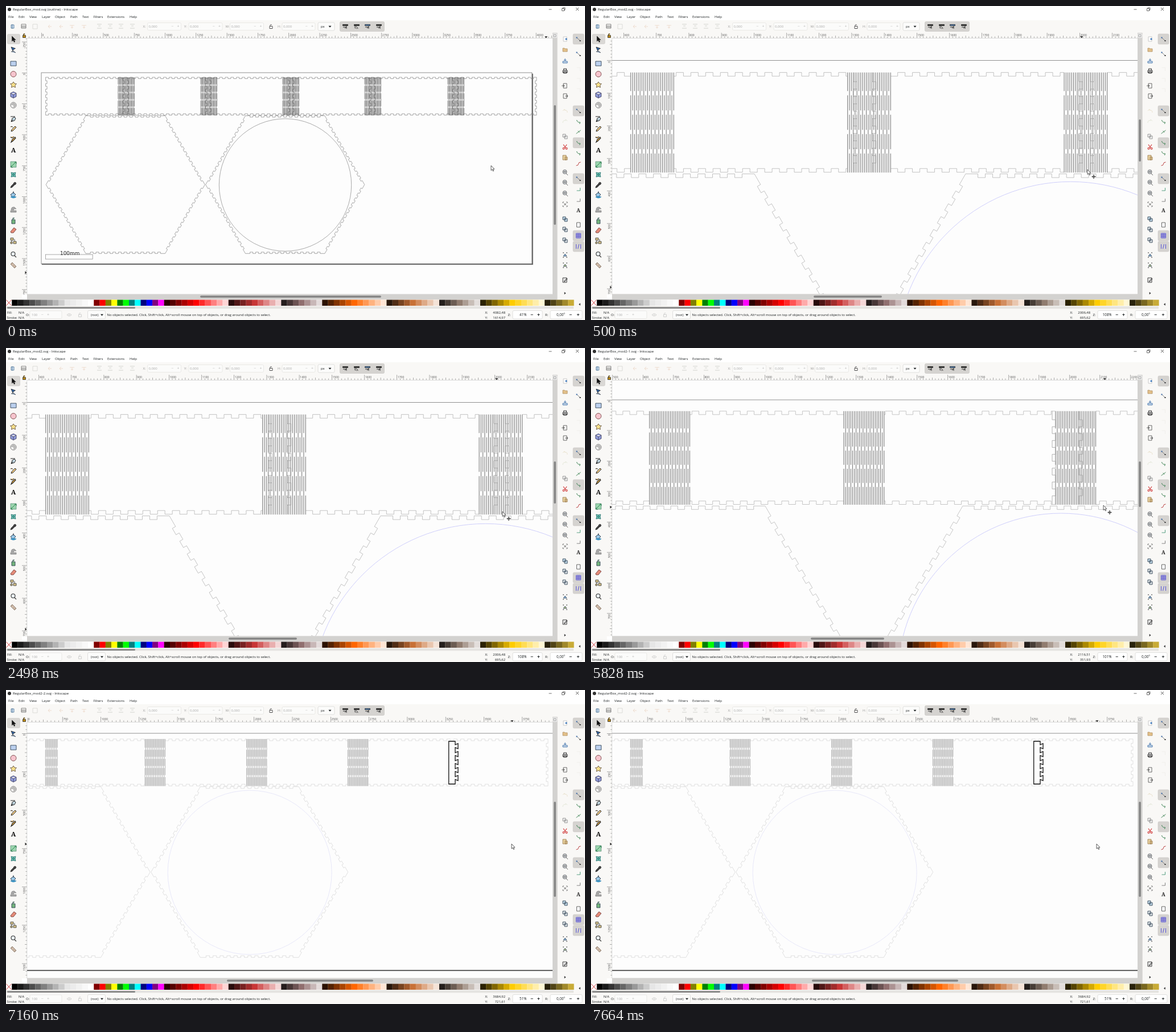
An HTML page with a canvas for the animation above (8 s loop, 1017 by 551 pixels).

```html
<!DOCTYPE html>
<html lang="en">
<head>
<meta charset="utf-8">
<title>Box drawing</title>
<style>
html, body { margin: 0; width: 100%; height: 100%; overflow: hidden; background: #fff; }
canvas { display: block; }
</style>
</head>
<body>
<canvas id="stage" width="1017" height="551"></canvas>
<script>
const ctx = document.getElementById('stage').getContext('2d');
const LOOP = 8000, SANS = '"Open Sans", "Noto Sans", sans-serif', SERIF = '"Noto Serif", serif';
const INK = '#1c2022', FAINT = '#d9d8d5', PANEL = '#f9f8f6', PAPER = '#fdfdfd';
const VIEW = { x: 37, y: 57, r: 960, b: 505.5 };
const FINGER = 22.68, DEPTH = 11.34;
const PAGE_W = 3968, PAGE_H = 1544;
const ROW = { left: 35, top: 37, bottom: 343 };

const scenes = [
  { end: 500, title: 'RegularBox_mod.svg (outline)', zoom: '41%', s: .2172, ox: 62, oy: 117, step: 250, rowEnd: 4005,
    pos: ['4082,48', '1614,97'], hinges: [621, 1289, 1952, 2615, 3287], joints: [660, 695, 1328, 1362, 1998, 2033, 2655, 2690, 3326, 3361],
    line: '#858585', circle: '#858585', hinge: '#666', joint: '#666', lw: .7, outline: true, v: [174, 384], h: [341, 659], tip: [852, 280] },
  { end: 3830, title: 'RegularBox_mod2.svg', zoom: '108%', s: .572, ox: -286, oy: 95.5, step: 100, rowEnd: 4005,
    pos: ['2006,48', '695,62'], hinges: [622, 1288, 1953], joints: [1306, 1364, 1998, 2033],
    line: '#b4b4b4', circle: '#c3c3fa', hinge: '#4c4c4c', joint: '#a0a0a0', lw: .8, v: [199, 273], h: [391, 511], tip: [872, 287], move: true },
  { end: 7160, title: 'RegularBox_mod2-1.svg', zoom: '101%', s: .535, ox: -230, oy: 91, step: 100, rowEnd: 4005,
    pos: ['2116,51', '351,93'], hinges: [622, 1260, 1955], joints: [1944, 2032],
    line: '#b8b8b8', circle: '#c3c3fa', hinge: '#4c4c4c', joint: '#a0a0a0', lw: .8, v: [199, 279], h: [386, 515], tip: [900, 276], move: true },
  { end: 8000, title: 'RegularBox_mod2-2.svg', zoom: '51%', s: .2692, ox: -103, oy: 76, step: 250, rowEnd: 3919,
    pos: ['3684,92', '721,61'], hinges: [640, 1289, 1952, 2613], firstWidth: 78, joints: [],
    line: '#d4d4d4', circle: '#dedef6', hinge: '#999', lw: .7, piece: true, v: [196, 363], h: [388, 645], tip: [888, 270] }
];

function rect(x, y, w, h, fill, stroke) {
  if (fill) { ctx.fillStyle = fill; ctx.fillRect(x, y, w, h); }
  if (stroke) { ctx.strokeStyle = stroke; ctx.lineWidth = .6; ctx.strokeRect(x, y, w, h); }
}

function pill(x, y, w, h, fill, stroke) {
  ctx.beginPath();
  ctx.roundRect(x, y, w, h, 2);
  if (fill) { ctx.fillStyle = fill; ctx.fill(); }
  if (stroke) { ctx.strokeStyle = stroke; ctx.lineWidth = .6; ctx.stroke(); }
}

// Size may carry a weight, as in 'bold 12'.
function text(str, x, y, color = INK, size = 6, align = 'left', family = SANS) {
  ctx.font = size + 'px ' + family;
  ctx.textAlign = align;
  ctx.textBaseline = 'alphabetic';
  ctx.fillStyle = color;
  ctx.fillText(str, x, y);
}

// Small drawing centred on x, y.
function icon(x, y, d, stroke = INK, fill, lw = .9) {
  const path = new Path2D(d);
  ctx.save();
  ctx.translate(x, y);
  if (fill) { ctx.fillStyle = fill; ctx.fill(path); }
  if (stroke) { ctx.strokeStyle = stroke; ctx.lineWidth = lw; ctx.stroke(path); }
  ctx.restore();
}

const DISC = 'M-5 0a5 5 0 1 0 10 0a5 5 0 1 0-10 0';
const LENS = 'M-4-1a3.5 3.5 0 1 0 7 0a3.5 3.5 0 1 0-7 0M2 2l3 3';
const PAGE = 'M-3-4h6v8h-6z';
const DOWN = 'M-2.5-1.2h5l-2.5 3z';
const ARROW = 'M-2.5-5v9l2.2-2 1.5 3.5 1.6-.7-1.6-3.3h3z';
const COPY = 'M-4-4h5v5h-5zM-1-1h5v5h-5z';
const PEN = 'M-4 4l2-6 4-2 2 2-2 4zM-4 4l4-4';
const LOCK = 'M-2.5-.5h5v4h-5zM-1.5-.5v-2q1.5-2 3 0';
const CURVE = 'M-3-3q1 5 6 4l-1 3';

// Appends an edge with evenly centred notches cut to the right of its direction.
function fingerEdge(x0, y0, x1, y1) {
  const len = Math.hypot(x1 - x0, y1 - y0), ux = (x1 - x0) / len, uy = (y1 - y0) / len;
  const n = Math.floor((len / FINGER - 1) / 2);
  const margin = (len - (2 * n - 1) * FINGER) / 2;
  const to = (a, d) => ctx.lineTo(x0 + ux * a - uy * d, y0 + uy * a + ux * d);
  to(0, 0);
  for (let i = 0; i < n; i++) {
    const a = margin + 2 * i * FINGER;
    to(a, 0); to(a, DEPTH); to(a + FINGER, DEPTH); to(a + FINGER, 0);
  }
  to(len, 0);
}

function fingerShape(corners) {
  ctx.beginPath();
  corners.forEach((c, i) => fingerEdge(...c, ...corners[(i + 1) % corners.length]));
  ctx.closePath();
  ctx.stroke();
}

function hexagon(cx, cy, r) {
  fingerShape(Array.from({ length: 6 }, (_, k) => {
    const a = (k - 2) * Math.PI / 3;
    return [cx + r * Math.cos(a), cy + r * Math.sin(a)];
  }));
}

function hinge(x, width, sc) {
  const cols = Math.round(width / 5.74);
  if (!sc.outline) rect(x - 1, ROW.top - 3, width + 2, ROW.bottom - ROW.top + 6, PAPER);
  ctx.strokeStyle = sc.hinge;
  ctx.beginPath();
  for (let i = 0; i <= cols; i++) {
    const cx = x + i * width / cols;
    let y = ROW.top;
    for (let gap = i % 2 ? 160 : 100.5; gap < 300; gap += 119) {
      ctx.moveTo(cx, y);
      ctx.lineTo(cx, gap - 6.5);
      y = gap + 6.5;
    }
    ctx.moveTo(cx, y);
    ctx.lineTo(cx, ROW.bottom + 1);
  }
  ctx.stroke();
}

function drawing(sc) {
  ctx.save();
  ctx.beginPath();
  ctx.rect(VIEW.x, VIEW.y, VIEW.r - VIEW.x, VIEW.b - VIEW.y);
  ctx.clip();
  rect(VIEW.x, VIEW.y, 930, 450, PAPER);
  ctx.translate(sc.ox, sc.oy);
  ctx.scale(sc.s, sc.s);
  const px = 1 / sc.s;

  rect(PAGE_W, 8, 1.8 * px, PAGE_H, '#555');
  rect(4, PAGE_H - 2, PAGE_W, 2 * px, '#555');
  ctx.lineWidth = .8 * px;
  ctx.strokeStyle = '#777';
  ctx.strokeRect(0, 0, PAGE_W, PAGE_H);

  ctx.lineWidth = sc.lw * px;
  ctx.strokeStyle = sc.line;
  fingerShape([[ROW.left, ROW.top], [sc.rowEnd, ROW.top], [sc.rowEnd, ROW.bottom], [ROW.left, ROW.bottom]]);
  hexagon(680.5, 904.5, 642.5);
  hexagon(1971.5, 904.5, 642.5);

  ctx.strokeStyle = sc.circle;
  ctx.beginPath();
  ctx.arc(1973, 907, 535, 0, 7);
  ctx.stroke();

  sc.hinges.forEach((x, i) => hinge(x, i === 0 && sc.firstWidth || 132, sc));
  ctx.strokeStyle = sc.joint;
  for (const x of sc.joints) {
    ctx.beginPath();
    fingerEdge(x, ROW.bottom, x, ROW.top);
    ctx.stroke();
  }

  ctx.strokeStyle = sc.line;
  ctx.strokeRect(35, 1469, 380, 37);
  text('100mm', 152, 1475, '#222', 41, 'left', '"DejaVu Sans", sans-serif');
  ctx.restore();
  if (sc.piece) dovetail();
}

function dovetail() {
  ctx.beginPath();
  ctx.moveTo(777.7, 90);
  ctx.lineTo(789, 90);
  for (let y = 94; y < 160; y += 14) {
    ctx.lineTo(789, y + 2);
    ctx.lineTo(794, y);
    ctx.lineTo(794, y + 9);
    ctx.lineTo(789, y + 7);
  }
  ctx.lineTo(789, 165);
  ctx.lineTo(777.7, 165);
  ctx.closePath();
  ctx.strokeStyle = '#111';
  ctx.lineWidth = 1.3;
  ctx.stroke();
}

function rulers(sc) {
  rect(28, 47, 932, 10, PANEL);
  rect(28, 47, 9, 459, PANEL);
  ctx.save();
  ctx.beginPath();
  ctx.rect(37, 46, 923, 11);
  ctx.rect(28, 57, 9, 449);
  ctx.clip();
  const minor = sc.step / 10;
  const ticks = (origin, from, to, draw) => {
    for (let k = Math.floor((from - origin) / sc.s / minor) - 10; origin + k * minor * sc.s < to; k++)
      draw(origin + k * minor * sc.s, k % 10 === 0 ? 9 : k % 5 === 0 ? 4 : 2.5, k % 10 === 0 && String(k * minor));
  };
  ticks(sc.ox, 37, 960, (x, h, label) => {
    rect(x, 56 - h, .6, h, '#777');
    if (label) text(label, x + 1.5, 52.5, '#555', 5);
  });
  ticks(sc.oy, 57, 506, (y, w, label) => {
    rect(37 - w, y, w, .6, '#777');
    if (!label) return;
    ctx.save();
    ctx.translate(33.5, y + 1.5);
    ctx.rotate(-Math.PI / 2);
    text(label, 0, 0, '#555', 5, 'right');
    ctx.restore();
  });
  const [u, v] = sc.pos.map(p => parseFloat(p.replace(',', '.')));
  icon(sc.ox + u * sc.s, 54.5, DOWN, null, '#222');
  icon(34.5, sc.oy + v * sc.s, 'M-1-2.5v5l3-2.5z', null, '#222');
  ctx.restore();
  rect(37, 56.3, 923, .5, '#bbb');
  rect(36.6, 57, .5, 449, '#bbb');
  icon(32, 52, LOCK, '#333', '#b8860b', .8);
}

function scrollbars(sc) {
  rect(960, 47, 8.5, 468, '#d3d2d0');
  rect(37, 505.5, 923, 9.5, '#d3d2d0');
  pill(962.3, sc.v[0], 3.6, sc.v[1] - sc.v[0], '#858585');
  pill(sc.h[0], 508.2, sc.h[1] - sc.h[0], 3.6, '#858585');
  pill(960.5, 48, 7.5, 8, '#eee');
  icon(964, 52, 'M-2-2h4v4h-4z', '#777', null, .6);
}

function numberBox(label, x, w, value) {
  text(label, x - 8, 38.2, '#999');
  pill(x, 29.5, w, 13, '#fbfbfa', '#e0dfdc');
  text(value, x + 2, 38.2, '#aaa');
  text('−', x + w - 17, 38.2, '#bbb', 7);
  text('+', x + w - 7, 38.2, '#bbb', 7);
}

function topBars(sc) {
  rect(0, 0, 1017, 25, '#fff');
  icon(6, 6, 'M-3 0a3 3 0 1 0 6 0a3 3 0 1 0-6 0', null, '#333');
  text(sc.title + ' - Inkscape', 12, 8.3, INK, 6.1);
  icon(956, 6, 'M-2.5 0h5', '#333', null, .7);
  icon(979, 5.5, 'M-2.5-1h4v4h-4zM-1-1v-1.5h4v4h-1.5', '#333', null, .7);
  icon(1003.5, 5.5, 'M-2.5-2.5l5 5M2.5-2.5l-5 5', '#333', null, .8);
  const menu = { File: 4, Edit: 22, View: 41, Layer: 63, Object: 86, Path: 113, Text: 134, Filters: 153.5, Extensions: 178, Help: 217 };
  for (const name in menu) text(name, menu[name], 20.6);

  rect(0, 25, 1017, 22, PANEL);
  icon(12, 36, 'M-3-3h5v6h-5zM-1-4v8', '#5c7f9f', '#cfe0f2');
  icon(31, 36, 'M-4-4h8v7h-8zM-4-1h8M-4 1h8', '#555', null, .7);
  icon(51, 36, 'M-4-4h8v8h-8z', FAINT);
  for (const x of [77, 97]) icon(x, 36, 'M-3 0h6M-3 0l3-3M-3 0l3 3', '#ecd9cb');
  for (const x of [116, 137]) icon(x, 36, 'M-4-2h8M0-2v5M-2 1l2 2 2-2', '#ecd9cb');
  for (const x of [164, 183, 202, 222]) icon(x, 36, 'M-4-4h8M-2-1h4M-4 3h8', '#cfcecb');
  numberBox('X:', 248.5, 59, '0,000');
  numberBox('Y:', 321, 59, '0,000');
  numberBox('W:', 393.5, 59, '0,000');
  icon(465.5, 36, LOCK, '#444', null, .9);
  numberBox('H:', 485, 58, '0,000');
  pill(548, 29, 29, 14, '#fcfcfb', '#cfcecb');
  text('px', 553, 38.2);
  icon(569, 36, DOWN, null, INK);
  pill(586.5, 27.5, 78, 17, '#d5d3d0', '#c5c3c0');
  for (const x of [596, 616, 635, 655]) {
    icon(x, 36, 'M-4.5-3.5h9v2h-9z', '#222', x === 635 ? '#4b83c3' : '#333', .8);
    icon(x, 36, x === 616 ? 'M-4 0q5-1 6 4M-4 2q3 0 4 2' : 'M-4 1h6M2-1v5M-1 3l3-2', '#222');
  }
}

function toolbox() {
  rect(0, 47, 28, 468, PANEL);
  pill(2.5, 49.5, 22, 17, '#dad8d5', '#cbc9c6');
  const x = 13;
  icon(x, 58, ARROW, '#111', '#111', .5);
  icon(x, 76, 'M-4-4l3 7 1.5-3 3-1.5zM-4 4q6-1 8 2', '#222', '#3465a4', .8);
  icon(x, 101, 'M-5-4h10v8h-10z', '#345', '#bcd0ee');
  icon(x, 119.5, DISC, '#744', '#f6c4cd');
  icon(x, 138, 'M0-5l1.8 3 3.7.5-2.6 2.6.6 3.9-3.5-1.8-3.5 1.8.6-3.9-2.6-2.6 3.7-.5z', '#654', '#f7e08a');
  icon(x, 156, 'M0-5.5l5 2.5v6l-5 2.5-5-2.5v-6zM-5-3l5 2.5 5-2.5M0-.5v6', '#335', '#8f9ad8', .8);
  icon(x, 174, DISC + 'M-3 0a3 3 0 1 1 3 3M-1 0a1 1 0 1 1 1 1', '#555', null, .8);
  icon(x, 199, PEN + 'M-5-5h8', '#222', '#cde3ef', 1);
  icon(x, 216, 'M-4 4l1-3 6-6 2 2-6 6zM-5-4q3-2 4 1', '#222', '#f0cb86', 1);
  icon(x, 234, 'M-4 5l2-5 5-4 1 2-5 5zM-5-4q3 3 6-1', '#222', '#e8b04b', 1.1);
  text('A', x, 257, '#111', 'bold 11.5', 'center', SERIF);
  icon(x, 278, 'M-5-5h10v10h-10z', '#476', '#9bd5ae', .6);
  icon(x, 278, 'M-4 4l8-8M-4 2v3h3M2-4h3v3', '#287a4a');
  icon(x, 296, 'M-4-4q4 2 8 0-2 4 0 8-4-2-8 0 2-4 0-8zM-3 0h6M0-3v6', '#1d6d6a', '#75c8b8');
  icon(x, 314, 'M-5 5l1-3 4-4 2 2-4 4zM0-3l3-2 2 2-2 3z', '#222', '#444', .8);
  icon(x, 331, 'M-5 0l5-4 4 4-5 5zM0-6v4', '#234', '#9cc8e6');
  icon(x, 335, 'M-5 0q5-2 10 0-5 4-10 0z', '#2176a8', '#3b98c8', .6);
  icon(x, 357, 'M-5 5h10v-3h-10zM-4 1q0-6 6-5l3 3h-4q-1 2 0 2z', '#777', '#a8a8a8', .6);
  icon(x, 376, 'M-3-1h6v7h-6zM-1-1v-3h3M-5-5v.1M-4-3v.1', '#345', '#73b57c');
  icon(x, 393, 'M-5 3l6-7 4 3-5 6h-4z', '#633', '#e58b78', .8);
  icon(x, 412, 'M-5-5h5v4h-5zM0 1h5v4h-5zM-5 2h3v3h-3zM-3-1v3M2-3v4', '#333', '#d8c48a', .8);
  icon(x, 436, LENS, '#333', '#e9f1f6', 1.1);
  icon(x, 455, 'M-5-2l3-3 7 7-3 3zM-3-2l1-1M0 1l1-1M2 3l1-1', '#654', '#d4bfae', .7);
}

function commands() {
  rect(968.5, 47, 48.5, 468, PANEL);
  const x = 982;
  icon(x, 58, PAGE, '#aaa', '#fff', .6);
  icon(x + 2, 58, 'M-1-1h2v2h-2z', '#3b77bc', '#3b77bc');
  icon(x, 77, 'M-4-3h3l1 1h4v5h-8z', '#a78657', '#e3c18a', .7);
  icon(x, 96, 'M-4 1h8v3h-8zM0-4v4M-2-2l2 2 2-2', '#3e6ea8', '#cbdcec', .9);
  icon(x, 114, 'M-4-1h8v4h-8zM-2.5-1v-3h5v3M-2.5 1h5v3h-5z', '#333', '#ddd');
  icon(x, 140, PAGE + 'M-6 0h5M-3-2l2 2-2 2', '#444', null, .8);
  icon(x, 158, PAGE + 'M0 0h5M3-2l2 2-2 2', '#444', null, .8);
  icon(x, 184, 'M-4 0l3-3v2q5-1 5 4', '#e8dfc9');
  icon(x, 202, 'M4 0l-3-3v2q-5-1-5 4', '#e2e6d6');
  icon(x, 229, COPY, '#777', '#eee', .7);
  icon(x, 247, 'M-3-4l4 6M3-4l-4 6M-4 3a1.5 1.5 0 1 0 3 0a1.5 1.5 0 1 0-3 0M1 3a1.5 1.5 0 1 0 3 0a1.5 1.5 0 1 0-3 0', '#cf3535', null, 1.1);
  icon(x, 266, 'M-4-4h6v8h-6zM0-1h4v5h-4z', '#987849', '#e6cf9c', .8);
  for (const y of [292, 310, 329]) icon(x, y, LENS + 'M-2-2h3v2h-3z', '#444', '#e4eaf0', .8);
  icon(x, 348, 'M-4-2v-2h2M2-4h2v2M4 2v2h-2M-2 4h-2v-2M-2-2l4 4M2-2l-4 4', '#555', null, .8);
  for (const y of [374, 392, 411]) icon(x, y, COPY, '#345', y === 374 ? '#c1dae9' : '#dde3e6', .9);
  for (const y of [437, 455]) {
    icon(x, y, 'M-4-4h2M2-4h2M-4 4h2M2 4h2', '#333', null, 1.1);
    icon(x, y, 'M-3 2l3-4 3 4z', '#456', y === 437 ? '#7faad1' : '#a3b57d', .8);
  }
  icon(x, 481, 'M-4-4h7v8h-7zM-2 2l5-5 1 1-5 5z', '#333', '#e7e7e7');
  icon(x, 504, 'M-1.3-2.3v4.6l2.8-2.3z', null, '#333');
}

function snapBar() {
  const x = 1005.5;
  for (const y of [58, 184, 240, 303, 403, 422]) pill(x - 9.5, y - 9, 19, 18, '#d5d3d0', '#c9c7c4');
  for (const y of [58, 84, 184, 303]) {
    icon(x, y, 'M-3-2.5l6 5.5', '#666', null, .8);
    icon(x - 3, y - 2.5, 'M-1-1h2v2h-2z', null, '#3465a4');
    icon(x + 3, y + 3, 'M-1-1h2v2h-2z', null, '#333');
  }
  for (const y of [111, 130, 148]) icon(x, y, 'M-3-3h6M3-3v6', '#f0eeeb');
  for (const y of [203, 240, 258]) icon(x, y, CURVE, '#3a8050', null, 1);
  icon(x, 221, 'M-4 3l8-6M-1-2l3 3', '#3a8050');
  icon(x, 277, 'M-4 3q4 0 4-3t4-3', '#b44', null, 1);
  for (const y of [321, 340]) icon(x, y, 'M-3 3h6v-5', y === 321 ? '#2d8a62' : '#666', null, .8);
  text('A', x, 361.5, '#222', 'bold 9', 'center', SERIF);
  icon(x, 384, PAGE, '#555', '#fff', .9);
  icon(x, 403, 'M-4-4h8v8h-8zM-4-1.3h8M-4 1.3h8M-1.3-4v8M1.3-4v8', '#3730d9', null, .8);
  icon(x, 422, 'M-4-4v8M-1 4l2-8M4-4v8', '#4a45d8', null, .9);
}

function swatches() {
  const gray = [0, 10, 20, 30, 40, 50, 60, 70, 80, 90, 92.5, 95, 97.5, 100].map(l => `hsl(0 0% ${l}%)`);
  const named = ['maroon', 'red', 'olive', 'yellow', 'green', 'lime', 'teal', 'aqua', 'navy', 'blue', 'purple', 'fuchsia'];
  const ramp = (hue, sat, n) => Array.from({ length: n }, (_, i) => `hsl(${hue} ${sat}% ${100 * (i + 1) / (n + 1)}%)`);
  const hues = [0, 24, 48].flatMap(h => [...ramp(h, 100, 11), ...ramp(h, 57, 9), ...ramp(h, 13, 7)]);
  return [...gray, ...named, ...hues].slice(0, 96);
}

function palette() {
  rect(0, 515, 1017, 16, PANEL);
  const w = 997.5 / 97;
  rect(0, 515.5, w, 10.5, '#fff');
  icon(5, 520.7, 'M-4.5-5l9 10M4.5-5l-9 10', '#c33', null, .9);
  swatches().forEach((c, i) => rect((i + 1) * w, 515.5, w + .1, 10.5, c));
  icon(1007.5, 523.5, 'M1.3-2.3v4.6l-2.8-2.3z', null, '#333');
  rect(0, 527, 997, 4.5, '#e5e4e1');
  pill(2, 528.3, 225, 2.6, '#858585');
}

function statusBar(sc) {
  rect(0, 531.5, 1017, 19.5, PANEL);
  text('Fill:', 2, 540.2, INK, 5.7);
  text('N/A', 22, 540.2, INK, 5.7);
  text('Stroke:', 1.5, 548.6, INK, 5.7);
  text('N/A', 22, 548.6, INK, 5.7);
  text('O:', 35, 544);
  pill(42, 535, 56, 13.5, '#fbfbfa', '#e0dfdc');
  text('100', 45, 544, '#aaa');
  text('−', 62, 544, '#bbb', 7);
  text('+', 72, 544, '#bbb', 7);
  icon(111, 542, 'M-4 0q4-4 8 0q-4 4-8 0M-1 0h2', '#ccc');
  icon(130, 542, LOCK, '#ccc');
  pill(143.5, 534.5, 31, 14.5, '#fcfcfb', '#cfcecb');
  text('(root)', 149, 543.8, INK, 5.3);
  icon(168.5, 542, DOWN, null, INK);
  text('No objects selected. Click, Shift+click, Alt+scroll mouse on top of objects, or drag around objects to select.', 177.5, 544, INK, 5.9);
  text('X:', 841.5, 540.2, INK, 5.8);
  text('Y:', 841.5, 548.8, INK, 5.8);
  sc.pos.forEach((p, i) => text(p, 877, 540.2 + i * 8.6, INK, 5.9, 'right'));
  text('Z:', 881.5, 544);
  pill(890, 534.5, 52, 14.5, '#fff', '#cfcecb');
  text(sc.zoom, 914.5, 544, INK, 6.3, 'right');
  text('R:', 947, 544);
  pill(956, 534.5, 56, 14.5, '#fff', '#cfcecb');
  text('0,00°', 967, 544, INK, 6.3);
  for (const x of [924, 992]) text('−', x, 544.5, INK, 'bold 8.5', 'center');
  for (const x of [935.5, 1005]) text('+', x, 544.5, INK, 'bold 8.5', 'center');
}

function pointer(sc) {
  const [x, y] = sc.tip;
  icon(x, y, 'M0 0v8.5l2-1.8 1.4 3.1 1.4-.6-1.4-3h2.5z', '#333', '#fff', .8);
  if (sc.move) icon(x + 11, y + 12.5, 'M-3 0h6M0-3v6M-1-2l1-1 1 1M-1 2l1 1 1-1M-2-1l-1 1 1 1M2-1l1 1-1 1', '#222', null, 1);
}

function draw(sc) {
  drawing(sc);
  topBars(sc);
  toolbox();
  rulers(sc);
  commands();
  snapBar();
  scrollbars(sc);
  palette();
  statusBar(sc);
  pointer(sc);
}

let shown;
function tick() {
  const t = performance.now() % LOOP;
  const sc = scenes.find(s => t < s.end);
  if (sc !== shown) draw(shown = sc);
  requestAnimationFrame(tick);
}
tick();
</script>
</body>
</html>
```
